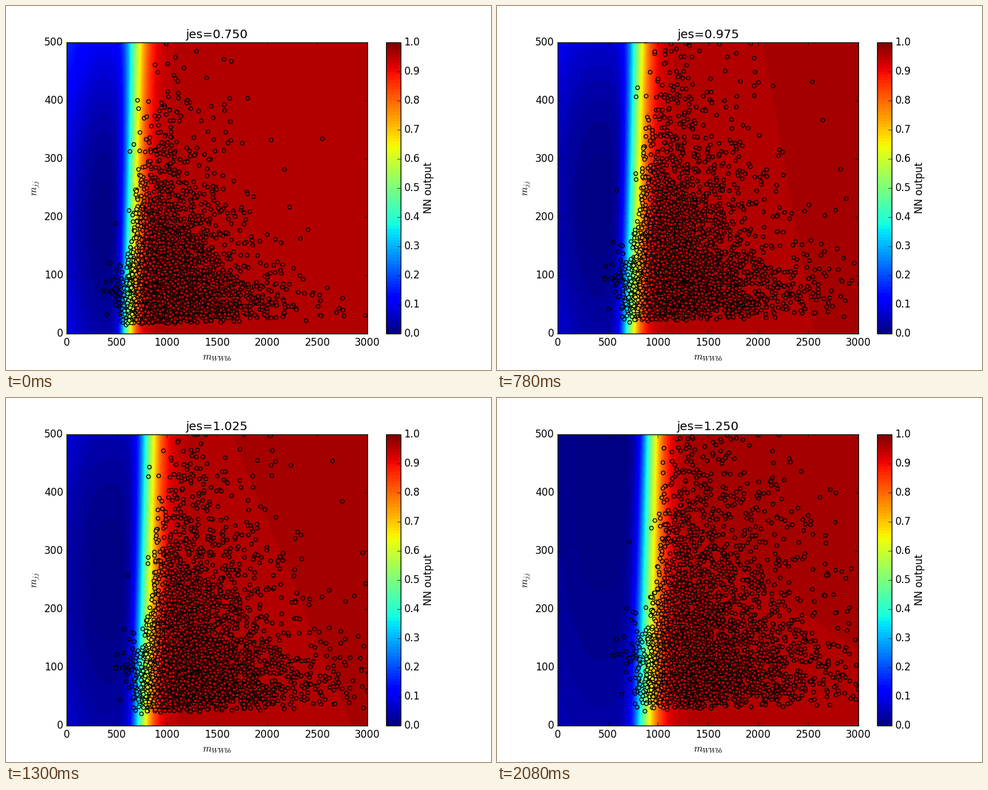
A matplotlib script for the animation above (2340 ms loop, 800 by 600 pixels).

```python
import numpy as np
import matplotlib.pyplot as plt
from matplotlib.animation import FuncAnimation
from matplotlib.cm import ScalarMappable
from matplotlib.colors import BoundaryNorm, ListedColormap

plt.style.use("classic")
plt.rcParams.update({"font.family": "DejaVu Sans", "ytick.alignment": "center"})

SCALES = [0.75, 0.9, 0.95, 0.975, 1.0, 1.025, 1.05, 1.1, 1.25]
LEVELS = np.linspace(0, 1, 101)
X_MAX, Y_MAX = 3000, 500

# Lone events on the low-mass side at scale 1: m_WWbb, m_jj, slope of m_WWbb.
LONE_EVENTS = [(600, 252, 442), (911, 534, 813), (896, 515, 713),
               (800, 417, 673), (812, 433, 567)]


def sigmoid(u):
    return 1 / (1 + np.exp(-u))


def nn_output(x, y, jes):
    """Dark well on the left, steep turn-on, nearly flat plateau on the right."""
    shift = jes - 1
    up = y / Y_MAX

    middle = (735 + 520 * shift) * (1 - up) + (815 + 480 * shift) * up
    width = (68 + 60 * shift) * (1 - up) + 75 * up
    u = (x - middle) / width
    turn_on = sigmoid(u - 0.2 * np.minimum(u, 0) ** 2)

    well_y = 190 + 240 * sigmoid((jes - 1.08) / 0.06)
    left = np.maximum(1 - x / 400, 0)
    above = np.maximum((y - well_y) / (Y_MAX - well_y), 0)
    below = np.maximum(1 - y / well_y, 0)
    low = (0.004 + (0.04 - 0.1 * shift) * left**2
           + 0.1 * sigmoid(-shift / 0.05) * above**2 + 0.03 * below**2)

    edge = (2710 + 5600 * shift) * (1 - up) + (1850 - 8000 * shift) * up
    high = 0.96 + 4e-6 * (x - edge) - 0.2 * max(0, 0.96 - jes)
    return low * (1 - turn_on) + np.clip(high, 0.955, 0.969) * turn_on


def make_events(n_peak=2000, n_tail=1300, n_early=45):
    """Events at scale 1: m_WWbb, m_jj and the slope of m_WWbb."""
    rng = np.random.default_rng(7)
    y = np.append(16 + rng.gamma(2.6, 28, n_peak),
                  rng.lognormal(np.log(195), 0.55, n_tail))
    offset = np.append(rng.gamma(1.8, 350, n_peak), rng.gamma(1.5, 300, n_tail))
    x = 660 + 0.65 * y + offset + rng.normal(0, 35, y.size)
    y = np.maximum(y, 12 + 0.006 * x + rng.exponential(7, y.size))

    x = np.append(x, 700 - rng.exponential(70, n_early).clip(0, 220))
    y = np.append(y, 40 + rng.gamma(2.5, 20, n_early))
    slope = x * rng.uniform(0.66, 0.92, x.size)
    events = rng.permutation(np.column_stack([x, y, slope]))
    return np.vstack([events, LONE_EVENTS]).T


event_x, event_y, event_slope = make_events()
grid_x, grid_y = np.meshgrid(np.linspace(0, X_MAX, 401), np.linspace(0, Y_MAX, 101))

jet = plt.get_cmap("jet")
bands = ListedColormap(jet((LEVELS[:-1] + LEVELS[1:]) / 2))
band_norm = BoundaryNorm(LEVELS, bands.N)

fig = plt.figure(figsize=(8, 6), dpi=100, facecolor="white")
ax = fig.add_subplot()
bar = fig.colorbar(ScalarMappable(band_norm, bands), ax=ax,
                   ticks=np.linspace(0, 1, 11), format="%.1f")
bar.minorticks_off()
bar.set_label("NN output", labelpad=3.5)
ax.set_xlabel("$m_{WWbb}$")
ax.set_ylabel("$m_{jj}$", labelpad=3.5)
title = ax.set_title("")
dots = ax.scatter(event_x, event_y, c=np.zeros(event_x.size), s=20, cmap=jet,
                  vmin=0, vmax=1, edgecolors="black", linewidths=1, zorder=2)
surface = None


def update(i):
    global surface
    jes = SCALES[i]
    if surface is not None:
        surface.remove()
    surface = ax.contourf(grid_x, grid_y, nn_output(grid_x, grid_y, jes),
                          levels=LEVELS, cmap=bands, norm=band_norm, zorder=1)
    x = event_x + event_slope * (jes - 1)
    y = event_y * jes
    dots.set_offsets(np.column_stack([x, y]))
    dots.set_array(nn_output(x, np.clip(y, 0, Y_MAX), jes))
    title.set_text(f"jes={jes:.3f}")
    ax.set(xlim=(0, X_MAX), ylim=(0, Y_MAX))
    return surface, dots, title


anim = FuncAnimation(fig, update, frames=len(SCALES), init_func=lambda: [],
                     interval=260, repeat=True, repeat_delay=0, blit=False)
plt.show()
```
